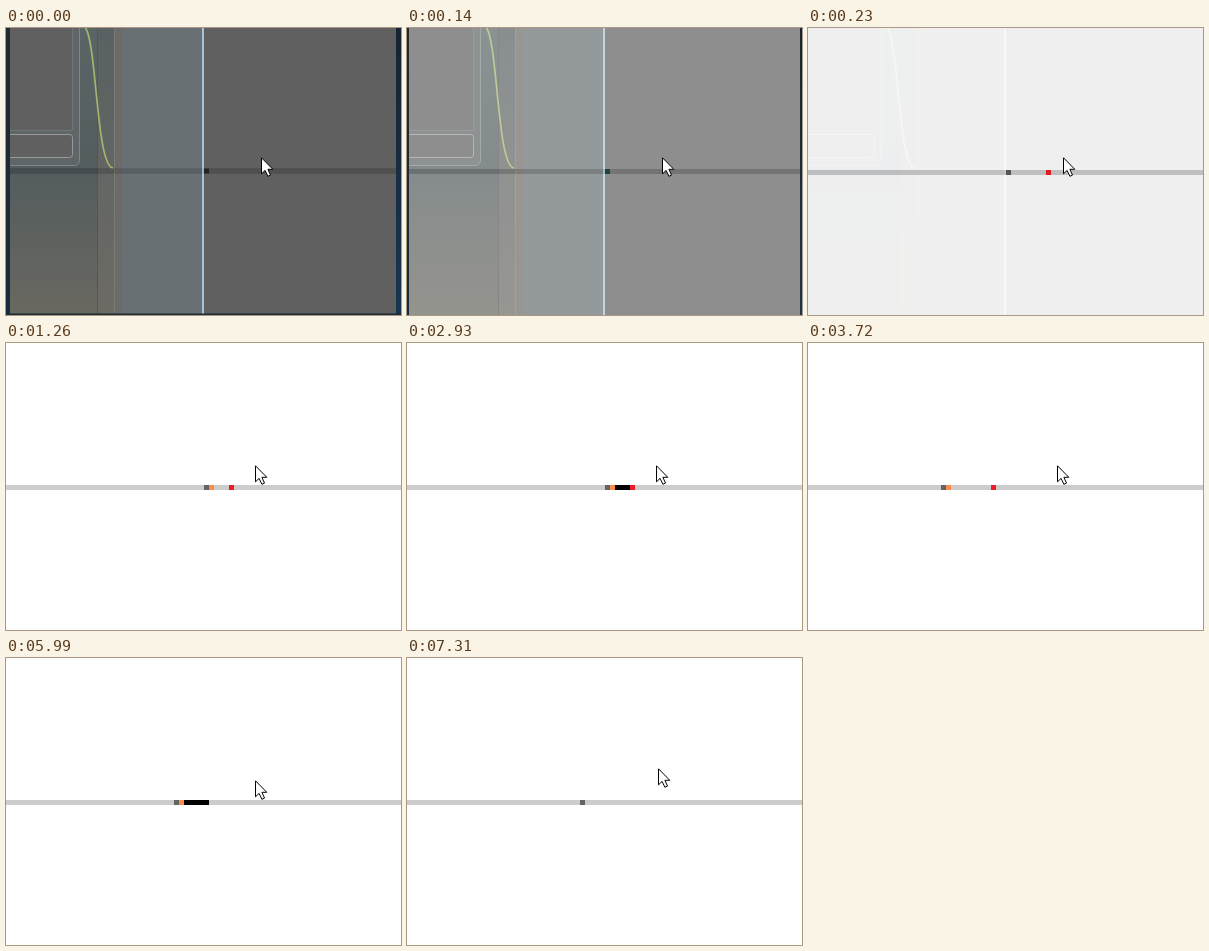
Write an HTML page with a canvas that moves like this. It is 395 by 287 pixels and loops after 7.41 s.

```html
<!DOCTYPE html>
<html lang="en">
<head>
<meta charset="utf-8">
<title>One-line duel</title>
<style>
html, body { margin: 0; width: 100%; height: 100%; overflow: hidden; background: #fff; }
canvas { display: block; }
</style>
</head>
<body>
<canvas id="stage" width="395" height="287"></canvas>
<script>
const W = 395, H = 287, LOOP = 7410, CELL = 5, ROW = 142;
const GREY = '#646464', ORANGE = '#ff8b4a', BLACK = '#000', RED = '#ed1c24', TEAL = '#6cd0c4';
const g = document.getElementById('stage').getContext('2d');

// Opening window: [start, opacity, left, right, lift, hero colour]
const opening = [
  [0, 0.31, 4, 390, 1.5, '#3c3c3c'],
  [140, 0.51, 2, 393, 1, '#236e69'],
  [180, 0.78, 0, W, 0.5, '#559366'],
  [230, 0.93, 0, W, 0, '#5a5a5a'],
  [310, 0.97, 0, W, 0, GREY],
  [390, 0.99, 0, W, 0, GREY],
  [480, 1, 0, W, 0, GREY]
];

const pointer = [
  [0, 255, 129], [630, 254, 115], [707, 251, 106],
  [783, 249, 114], [860, 249, 122], [7310, 251, 110]
];

// Latest entry whose start time has passed
const at = (list, t) => list.filter(e => e[0] <= t).pop();

// Whole-cell motion from a to b over n ticks
function glide(t, start, end, n, a, b) {
  const k = Math.min(n, Math.max(0, Math.floor((t - start) / (end - start) * n + 0.001) + 1));
  return a + Math.round((b - a) / CELL * k / n) * CELL;
}

function rect(x, y, w, h, fill) {
  g.fillStyle = fill;
  g.fillRect(x, y, w, h);
}

function fade(y0, y1, top, bottom) {
  const f = g.createLinearGradient(0, y0, 0, y1);
  f.addColorStop(0, top);
  f.addColorStop(1, bottom);
  return f;
}

function frame(x, y, w, h, r, fill, line) {
  g.beginPath();
  g.roundRect(x, y, w, h, r);
  g.fillStyle = fill;
  g.fill();
  g.strokeStyle = line;
  g.lineWidth = 1;
  g.stroke();
}

function desktop() {
  rect(0, 0, W, H, '#191919');
  rect(0, 0, 108, 140, fade(0, 140, '#102022', '#061416'));
  rect(0, 138, 108, 149, fade(138, 287, '#061316', '#252418'));
  rect(92, 0, 16, H, fade(0, 287, '#0e1a1b', '#2b281f'));
  rect(108, 0, 8, H, '#2a2823');
  rect(116, 0, 80, H, '#243034');
  frame(-10, -10, 83.5, 147.5, 5, '#182123', '#465050');
  frame(-10, -10, 76.5, 112.5, 0, '#191919', '#303636');
  frame(-10, 106.5, 76.5, 23, 3, '#191919', '#666c6a');
  rect(91, 0, 1, H, '#050a0b');
  rect(108, 0, 1, H, '#403e38');
  g.beginPath();
  g.moveTo(79, -1);
  g.bezierCurveTo(91, 14, 90, 138, 107, 140);
  g.strokeStyle = '#7c922c';
  g.lineWidth = 1.7;
  g.stroke();
  rect(196, 0, 2, H, '#84a8c0');
}

function scene(t) {
  const s = { hero: 198, hilt: 0, red: 238, blade: null, wave: null };
  if (t < 180) s.red = null;
  else if (t < 230) s.red = 247;
  else if (t >= 630) s.red = glide(t, 630, 860, 3, 238, 223);
  if (t >= 860) s.hilt = 1;
  if ((t >= 1110 && t < 1260) || (t >= 2930 && t < 3010)) s.blade = [208, 3];

  if (t >= 3260) {
    s.hero = glide(t, 3260, 3720, 6, 198, 128);
    s.hilt = -1;
    s.red = glide(t, 3260, 3720, 7, 223, 183);
  }
  if (t >= 3720) {
    s.hero = 133;
    s.hilt = 1;
    s.red = 183;
  }
  if (t >= 5000 && t < 5420) {
    const k = Math.floor((t - 5000) / 84);
    const head = Math.min(208, 193 + k * 10);
    const tail = 163 + k * 10;
    s.wave = [tail, Math.max(0, (head - tail) / CELL)];
    s.blade = [158 + k * 10, 1];
  }
  if (t >= 5084) {
    s.hero = glide(t, 5084, 5590, 7, 133, 168);
    s.red = glide(t, 5084, 5420, 4, 183, 203);
  }
  if (t >= 5840) {
    s.blade = t < 5993 ? [178, 5] : null;
    if (t >= 5917) s.red = null;
  }
  if (t >= 6070) {
    s.hero = 173;
    s.hilt = 0;
  }
  return s;
}

function arrow(x, y) {
  const p = [[0, 0], [0, 16], [3.6, 12.6], [6.4, 18.5], [9, 17.3], [6.4, 11.5], [11.3, 11.5]];
  g.beginPath();
  p.forEach(([a, b]) => g.lineTo(x + 0.5 + a, y + 0.8 + b));
  g.closePath();
  g.fillStyle = '#fff';
  g.fill();
  g.strokeStyle = '#000';
  g.lineWidth = 1;
  g.stroke();
}

function draw(t) {
  const [, alpha, left, right, lift, heroInk] = at(opening, t);
  const s = scene(t);
  const y = ROW - lift;
  const cells = (x, n, ink) => rect(x, y, n * CELL, CELL, ink);

  g.globalAlpha = 1;
  desktop();
  // Each row item replaces what lies under it, so the row shares one opacity
  g.globalAlpha = alpha;
  rect(left, 0, right - left, y, '#fff');
  rect(left, y + CELL, right - left, H - y - CELL, '#fff');
  if (alpha < 1) {
    const stops = [left, s.hero, s.hero + CELL];
    if (s.red !== null) stops.push(s.red, s.red + CELL);
    stops.push(right);
    const inks = ['#ccc', heroInk, '#ccc', t < 230 ? '#559366' : RED, '#ccc'];
    for (let i = 0; i + 1 < stops.length; i++) cells(stops[i], (stops[i + 1] - stops[i]) / CELL, inks[i]);
  } else {
    cells(0, W / CELL, '#ccc');
    if (s.wave) cells(...s.wave, TEAL);
    if (s.blade) cells(...s.blade, BLACK);
    if (s.red !== null) cells(s.red, 1, RED);
    if (s.hilt) cells(s.hero + s.hilt * CELL, 1, ORANGE);
    cells(s.hero, 1, GREY);
  }
  g.globalAlpha = 1;
  if (left > 0) {
    rect(0, 0, left, H, fade(0, H, '#20292d', '#172b3a'));
    rect(right, 0, W - right, H, fade(0, H, '#172431', '#183650'));
    if (t < 140) rect(0, 285.5, W, 1.5, '#1c2c36');
  }
  const [, px, py] = at(pointer, t);
  arrow(px, py);
}

const born = performance.now();
function tick() {
  draw((performance.now() - born) % LOOP);
  requestAnimationFrame(tick);
}
tick();
</script>
</body>
</html>
```
